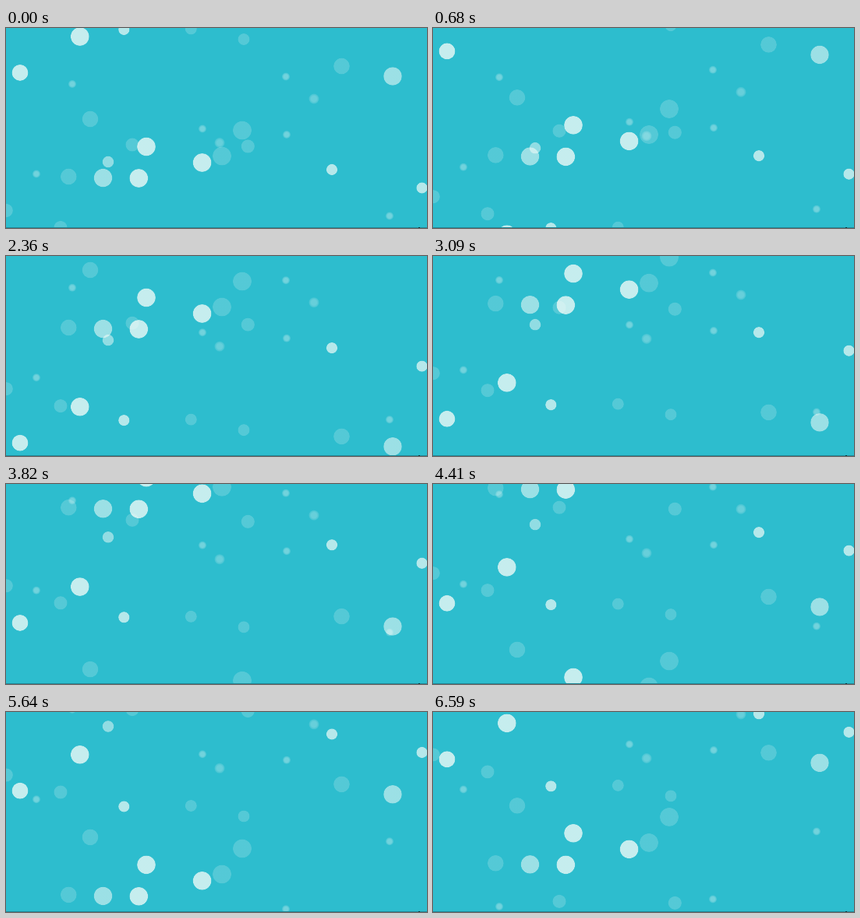
These frames come from a looping animation (540 by 257 pixels, 6630 ms). An HTML page with a canvas:

```html
<!DOCTYPE html>
<html lang="en">
<head>
<meta charset="utf-8">
<title>Rising bubbles</title>
<style>
html, body { margin: 0; width: 100%; height: 100%; overflow: hidden; background: #2dbdce; }
canvas { display: block; }
</style>
</head>
<body>
<canvas id="stage" width="540" height="257"></canvas>
<script>
const W = 540, H = 257, LOOP = 6630, FPS = 22;
const WATER = "#2dbdce";
const BRIGHT = 0.73, PALE = 0.53, FAINT = 0.19, SMALL = 0.33;
const ctx = document.getElementById("stage").getContext("2d");

// Depth sets speed (px per step), wrap margin and edge softness.
const far = { speed: 0.61, margin: 4.5, soft: 0.55 };
const mid = { speed: 1.245, margin: 8, soft: 0.93 };
const near = { speed: 1.93, margin: 12.4, soft: 0.96 };

const group = (depth, radius, alpha, ...starts) => ({ ...depth, radius, alpha, starts });

// Bubbles of one look share a group; each has only its starting centre.
const groups = [
  group(far, 5, SMALL, [85, 72], [359, 62.5], [252, 129.5], [360, 137], [39, 187.5], [492, 241.5]),
  group(far, 6.5, 0.28, [395, 91], [274, 147.5]),
  group(mid, 7.2, BRIGHT - 0.08, [418, 182], [533.5, 205.5], [151.3, 2]),
  group(mid, 7.4, PALE - 0.05, [131, 172]),
  group(mid, 7.6, FAINT, [237.3, 1], [305, 14.5]),
  group(mid, 8.7, FAINT, [70, 256.5], [0.3, 234.5], [162, 150], [310.3, 152]),
  group(near, 10.5, BRIGHT, [18, 57.4]),
  group(near, 10.4, FAINT, [108, 117], [80.3, 191], [430.5, 49]),
  group(near, 11.8, PALE, [496, 62], [124.5, 192.6]),
  group(near, 11.9, BRIGHT, [94.8, 11], [170.3, 193], [180, 152.5], [251.6, 173]),
  group(near, 12, FAINT, [277, 164.6], [303, 131.6])
];

function bubble(x, y, { radius, alpha, soft }) {
  const fill = ctx.createRadialGradient(x, y, radius * soft, x, y, radius);
  fill.addColorStop(0, `rgba(254,255,250,${alpha})`);
  fill.addColorStop(1, `rgba(254,255,250,${alpha * 0.35})`);
  ctx.fillStyle = fill;
  ctx.beginPath();
  ctx.arc(x, y, radius, 0, Math.PI * 2);
  ctx.fill();
}

// Rises from y0 and re-enters from below once fully out of view.
function rise(y0, { speed, margin }, travel) {
  const span = H + 2 * margin;
  return (y0 + margin - speed * travel + span) % span - margin;
}

function draw(time) {
  const t = Math.floor((time % LOOP) / 10) * 10;
  const step = Math.floor((t + 4.99) * FPS / 1000);
  const travel = Math.max(0, step - 0.7); // the first step is a short one

  ctx.fillStyle = WATER;
  ctx.fillRect(0, 0, W, H);
  for (const g of groups) {
    for (const [x, y] of g.starts) bubble(x, rise(y, g, travel), g);
  }
  ctx.fillStyle = "#1f8998";
  ctx.fillRect(0, H - 1, W, 1);
  ctx.fillStyle = "#0b2f35";
  ctx.fillRect(529, H - 1, 2, 1);
}

const start = performance.now();
function tick() {
  draw(performance.now() - start);
  requestAnimationFrame(tick);
}
tick();
</script>
</body>
</html>
```
